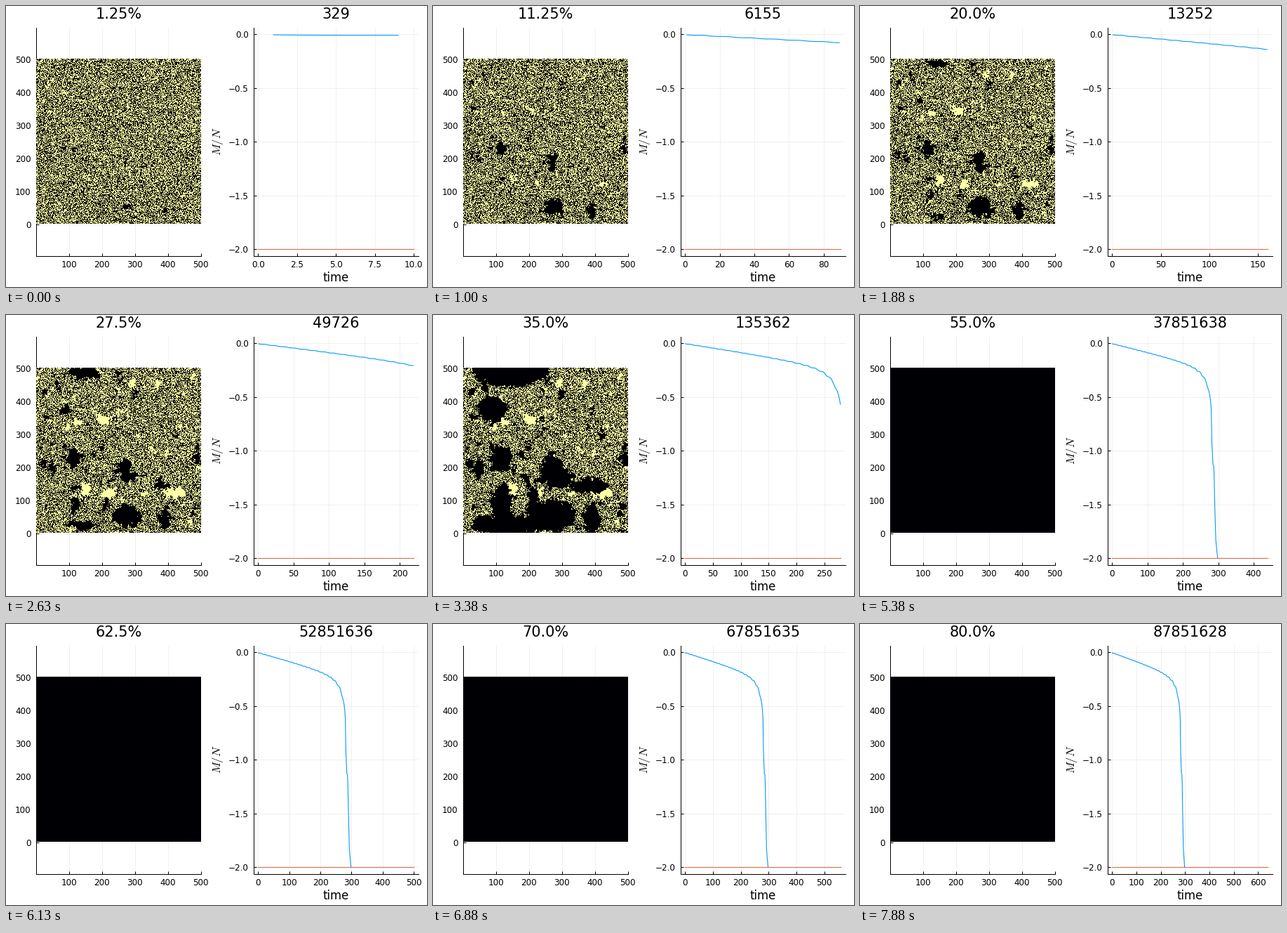
These frames come from a looping animation (600x400 px, 8 s). A matplotlib script:

```python
import numpy as np
import matplotlib.pyplot as plt
from matplotlib.animation import FuncAnimation
from matplotlib.colors import ListedColormap

W, H = 600, 400
PX = 0.72            # points per pixel at 100 dpi
FRAMES = 64
SIDE = 235           # lattice image size in pixels
TOP, BOTTOM = 31, 355.5

plt.rcParams.update({"font.family": "DejaVu Sans", "mathtext.fontset": "cm"})
rng = np.random.default_rng(7)


def magnet(t):
    """Slow drift with a divergence, then the collapse to -2."""
    slow = np.minimum(t, 280)
    drift = -0.0008 * slow - 0.375 * (20 / (300 - slow)) ** 1.7
    drop = np.interp(t, [280, 282, 285, 287.5, 290, 293, 298],
                     [-.6, -.93, -1.13, -1.14, -1.5, -1.83, -2])
    return np.where(t < 280, drift, drop)


def stepped(t):
    """The curve as drawn, with small plateaus."""
    taper = np.clip((285 - t) / 40, 0, 1)
    return magnet(t + 2.2 * taper * np.sin(0.45 * t))


def smooth(passes):
    a = rng.standard_normal((SIDE, SIDE))
    for _ in range(passes):
        a = a + np.roll(a, 1, 0)
        a = a + np.roll(a, 1, 1)
        a /= a.std()
    return a


yy, xx = np.mgrid[:SIDE, :SIDE] + 0.5
wx = xx + 2 * smooth(10) + smooth(2)
wy = yy + 2 * smooth(10) + smooth(2)


def growth(nuclei):
    """Size factor at which each cell is reached by the nearest nucleus."""
    return np.min([np.hypot((wx - x) / rx, (wy - y) / ry)
                   for x, y, rx, ry in nuclei], axis=0)


def scatter(count, small, large):
    spots = rng.uniform(0, SIDE, (count, 2))
    sizes = rng.uniform(small, large, (count, 2))
    return list(np.hstack([spots, sizes]))


# Main nuclei as (x, y, rx, ry)
early = [(130, 211, 14, 11), (54, 129, 7, 10), (127, 148, 7, 13),
         (183, 215, 6, 11), (22, 145, 4, 6), (229, 130, 4, 4)]
late = [(68, 6, 50, 20), (42, 60, 20, 18), (65, 224, 50, 14),
        (55, 195, 14, 24), (100, 195, 8, 24), (135, 156, 22, 14),
        (180, 168, 26, 9)]
bright = [(104, 178, 7, 7), (197, 177, 12, 6), (97, 74, 9, 4), (70, 174, 5, 8)]

# Cells turn dark in growth order, at the pace set by the curve
key = np.minimum(0.5 * growth(early + scatter(60, 1, 3)),
                 0.5 + 0.5 * growth(late))
rank = np.argsort(np.argsort(key, axis=None)).reshape(key.shape) / key.size
clock = np.linspace(0, 298, 1000)
dark = np.interp(2 * rank, -magnet(clock), clock)

reach = growth(bright + scatter(30, 1.5, 4))
light = np.where(reach < 1.25, 160 * reach, np.inf)
noise = rng.integers(0, 2, (SIDE, SIDE))


def lattice(t):
    cells = noise.copy()
    cells[light <= t] = 1
    cells[dark <= t] = 0
    return cells


def counter(n):
    if n >= 30:
        return round(np.interp(n, [30, 36, 44, 56, 64],
                               [2851645, 17851642, 37851638, 67851635, 87851628]))
    logs = np.interp(np.log(n), np.log([1, 16, 28, 29]),
                     np.log([329, 13252, 135362, 631874]))
    return round(np.exp(logs))


def nice_ticks(top):
    """Pick the step with the best mix of count, coverage and roundness."""
    span, best = 1.06 * top, (-1, None)
    for mag in (1, 10, 100):
        for q, nice in ((1, 1), (5, .9), (2.5, .5), (2, .7)):
            step = q * mag
            count = int(1.03 * top / step) + 1
            if 4 <= count <= 8:
                score = ((1 - abs(count - 5) / 5) / 4 + nice / 4
                         + 0.5 * span / (step * (count - 1)))
                best = max(best, (round(score, 6), step), key=lambda b: b[0])
    step = best[1]
    ticks = np.arange(0, 1.03 * top, step)
    return ticks, [f"{v:.1f}" if step % 1 else f"{v:.0f}" for v in ticks]


fig = plt.figure(figsize=(W / 100, H / 100), dpi=100, facecolor="white")


def place(left, top, width, bottom):
    return fig.add_axes([left / W, 1 - bottom / H, width / W, (bottom - top) / H])


def panel(left):
    ax = place(left, TOP, 235.5, BOTTOM)
    ax.set_axisbelow(True)
    ax.grid(color="black", alpha=0.06, lw=1 * PX)
    ax.spines[["top", "right"]].set_visible(False)
    for side in ("left", "bottom"):
        ax.spines[side].set_linewidth(1 * PX)
    ax.tick_params(direction="in", length=4 * PX, width=1 * PX,
                   labelsize=12 * PX)
    ax.tick_params(axis="both", pad=7 * PX)
    return ax


def label(x, y, text, size, **kw):
    kw = {"ha": "center", "va": "baseline", **kw}
    return fig.text(x / W, 1 - y / H, text, fontsize=size * PX, **kw)


axl, axr = panel(42.5), panel(352.5)

axl.set_xlim(0, 500.5)
half = 250 * (BOTTOM - TOP) / SIDE
axl.set_ylim(250.5 - half, 250.5 + half)
axl.set_xticks(range(100, 501, 100))
axl.set_yticks(range(0, 501, 100))

grid = place(43, 75, SIDE, 75 + SIDE)
grid.axis("off")
image = grid.imshow(noise, cmap=ListedColormap(["#000004", "#fcffa4"]),
                    vmin=0, vmax=1, interpolation="nearest", aspect="auto")

axr.set_ylim(-2.0588, 0.06)
levels = np.arange(0, -2.1, -0.5)
axr.set_yticks(levels, [f"{v:.1f}".replace("-", "\u2212") for v in levels])
curve, = axr.plot([], [], color="#009afa", lw=1.1 * PX)
floor, = axr.plot([], [], color="#e26f46", lw=1.1 * PX)

percent = label(160.5, 18.5, "", 20.9)
count = label(470.5, 18.5, "", 20.9)
label(470.5, 392, "time", 16.5)
label(302.5, 193, "$M/N$", 16.4, va="center", rotation=90)


def update(i):
    n = i + 1
    top = 10 * n
    t = np.arange(1, top)
    image.set_data(lattice(top))
    curve.set_data(t, stepped(t))
    floor.set_data([0, top], [-2, -2])
    axr.set_xlim(-0.03 * top, 1.03 * top)
    axr.set_xticks(*nice_ticks(top))
    percent.set_text(f"{1.25 * n}%")
    count.set_text(str(counter(n)))
    return image, curve, floor, percent, count


anim = FuncAnimation(fig, update, frames=FRAMES, interval=125, repeat=True)
plt.show()
```
